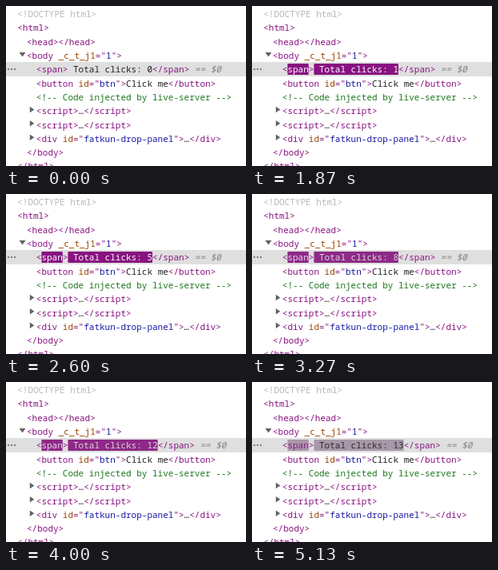
Write an HTML page that moves like this. It is 300 by 200 pixels and loops after 5190 ms.

```html
<!DOCTYPE html>
<html lang="en">
<head>
<meta charset="utf-8">
<title>DOM inspector</title>
<style>
  html, body { margin: 0; width: 100%; height: 100%; overflow: hidden; background: #fff; }
  svg { display: block; width: 300px; height: 200px; }
  text { font: 11px "Noto Sans Mono", "DejaVu Sans Mono", monospace; white-space: pre; fill: #202124; }
  .tag { fill: #881280; }
  .attr { fill: #994500; }
  .value { fill: #1a1aa6; }
  .comment { fill: #1c781c; }
  .doctype { fill: #b8b8b8; }
  .ref { fill: #808080; font-style: italic; }
  .arrow, .dots { fill: #626262; }
</style>
</head>
<body>
<svg id="stage" viewBox="0 0 300 200" xmlns="http://www.w3.org/2000/svg"></svg>
<script>
const LOOP = 5190, FPS = 15;
const ROW = 17.3, TOP = 1, BASELINE = 13.1, CHAR = 6.6;
const FLASH_FRAMES = 1.4 * FPS;
const CLICKS = [28, 31, 34, 36, 39, 42, 45, 48, 51, 53, 56, 59, 62];
const HOVERS = [
  { row: 11, from: 5, to: 9 },
  { row: 10, from: 13, to: 14 },
  { row: 1, from: 14, to: 15 },
  { row: 5, from: 65, to: 66 }
];
const PURPLE = [136, 18, 128], FADED = [170, 158, 170];
const WHITE = [255, 255, 255], INK = [32, 33, 36];

const stage = document.getElementById('stage');
const rowTop = row => TOP + row * ROW;
const rowEdge = row => Math.round(rowTop(row));
const indent = depth => 14.2 + depth * 11.8;

function add(parent, name, attrs = {}, content = '') {
  const el = document.createElementNS('http://www.w3.org/2000/svg', name);
  for (const key in attrs) el.setAttribute(key, attrs[key]);
  el.textContent = content;
  parent.appendChild(el);
  return el;
}

// Each line: depth, arrow kind, then [class, text] runs.
const tag = text => ['tag', text];
const folded = name => [tag(`<${name}>`), ['', '…'], tag(`</${name}>`)];
const lines = [
  [0, '', ['doctype', '<!DOCTYPE html>']],
  [0, '', tag('<html>')],
  [1, '', tag('<head></head>')],
  [1, 'open', tag('<body '), ['attr', '_c_t_j1'], tag('="'), ['value', '1'], tag('">')],
  [2, '', tag('<'), tag('span'), tag('>'), ['', ' Total clicks: 0'], tag('</span>'), ['ref', ' == $0']],
  [2, '', tag('<button '), ['attr', 'id'], tag('="'), ['value', 'btn'], tag('">'), ['', 'Click me'], tag('</button>')],
  [2, '', ['comment', '<!-- Code injected by live-server -->']],
  [2, 'closed', ...folded('script')],
  [2, 'closed', ...folded('script')],
  [2, 'closed', tag('<div '), ['attr', 'id'], tag('="'), ['value', 'fatkun-drop-panel'], tag('">'), ['', '…'], tag('</div>')],
  [1, '', tag('</body>')],
  [0, '', tag('</html>')]
];

const SELECTED = 4;
const hover = add(stage, 'path', { fill: '#ebf0fb' });
add(stage, 'rect', {
  x: 0, y: rowEdge(SELECTED), width: 300,
  height: rowEdge(SELECTED + 1) - rowEdge(SELECTED), fill: '#dfdfdf'
});

const flashBox = (column, length) => add(stage, 'rect', {
  x: indent(2) + column * CHAR, y: 72, width: length * CHAR, height: 14, rx: 1
});
const nameBox = flashBox(1, 4);
const textBox = flashBox(6, 16);

const runs = lines.map(([depth, arrow, ...parts], row) => {
  const x = indent(depth), mid = rowTop(row) + 7.7;
  if (arrow) {
    const d = arrow === 'open'
      ? `M${x - 9.5} ${mid - 2.5}h8l-4 5.5z`
      : `M${x - 8} ${mid - 4}v7.5l5.5 -3.75z`;
    add(stage, 'path', { class: 'arrow', d });
  }
  const text = add(stage, 'text', { x, y: Math.round(rowTop(row) + BASELINE) });
  return parts.map(([cls, str]) => add(text, 'tspan', { class: cls }, str));
});
for (const x of [3, 7, 11]) add(stage, 'circle', { class: 'dots', cx: x, cy: 79, r: 1.1 });

const [, nameRun, , countRun] = runs[SELECTED];

// cubic-bezier(0, 0, 0.2, 1)
function ease(x) {
  let lo = 0, hi = 1;
  for (let i = 0; i < 24; i++) {
    const s = (lo + hi) / 2;
    if (0.6 * s * s + 0.4 * s * s * s < x) lo = s; else hi = s;
  }
  return lo * lo * (3 - 2 * lo);
}

const mix = (a, b, p) => `rgb(${a.map((v, i) => Math.round(v + (b[i] - v) * p))})`;

function render(time) {
  const frame = Math.floor((time + 4) * FPS / 1000);

  const spot = HOVERS.find(h => frame >= h.from && frame < h.to);
  hover.style.display = spot ? '' : 'none';
  if (spot) {
    const top = rowEdge(spot.row), bottom = rowEdge(spot.row + 1);
    hover.setAttribute('d', `M300 ${top}H9q-6 0 -6 6V${bottom - 6}q0 6 6 6H300z`);
  }

  const count = CLICKS.filter(click => click <= frame).length;
  const label = ` Total clicks: ${count}`;
  countRun.textContent = label;
  textBox.setAttribute('width', label.length * CHAR);

  const p = count ? ease(Math.min(1, (frame - CLICKS[count - 1]) / FLASH_FRAMES)) : 1;
  for (const box of [nameBox, textBox]) {
    box.style.display = count ? '' : 'none';
    box.style.fill = mix(PURPLE, FADED, p);
  }
  nameRun.style.fill = mix(WHITE, PURPLE, p);
  countRun.style.fill = mix(WHITE, INK, p);
}

const start = performance.now();
function tick() {
  render((performance.now() - start) % LOOP);
  requestAnimationFrame(tick);
}
tick();
</script>
</body>
</html>
```
